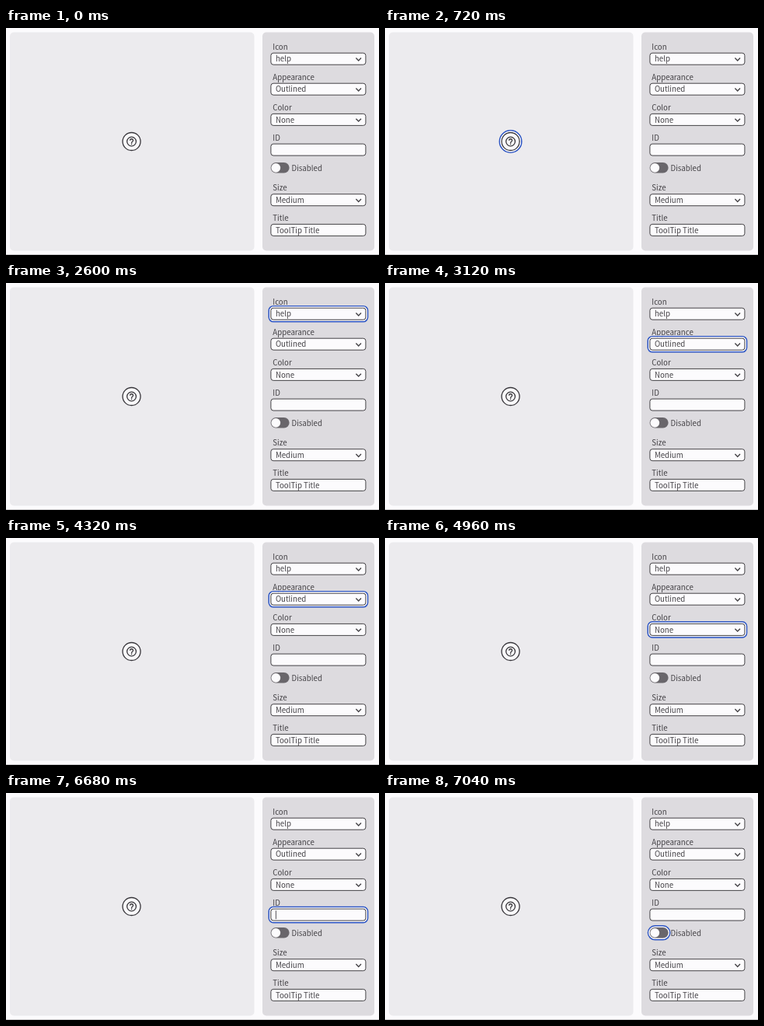
Write an HTML page that moves like this. It is 480x292 px and loops after 8 s.

```html
<!DOCTYPE html>
<html lang="en">
<head>
<meta charset="utf-8">
<title>Icon button playground</title>
<style>
  html, body { margin: 0; width: 100%; height: 100%; overflow: hidden; background: #fcfbfd; }
  svg { display: block; width: 480px; height: 292px; }
  text { font: 9.7px "Noto Sans CJK JP", "Noto Sans CJK SC", "Noto Sans CJK", "Open Sans", sans-serif; fill: #444246; }
</style>
</head>
<body>
<svg id="stage" viewBox="0 0 480 292"></svg>
<script>
const LOOP = 8000;
const INK = '#444246', PAPER = '#fcfbfd', LEFT = '#ecebee', RIGHT = '#dddbdf', BLUE = '#2c55c4';
const stage = document.getElementById('stage');

function add(tag, attrs, text = '') {
  const el = document.createElementNS('http://www.w3.org/2000/svg', tag);
  for (const key in attrs) el.setAttribute(key, attrs[key]);
  el.textContent = text;
  return stage.appendChild(el);
}
const box = (x, y, width, height, rx, attrs) => add('rect', { x, y, width, height, rx, ...attrs });
const write = (x, y, text) => add('text', { x, y }, text);

function field(label, top, value, isSelect) {
  write(343.3, top - 4.2, label);
  box(340.9, top + .4, 122, 15, 3.2, { fill: PAPER, stroke: INK, 'stroke-width': 1 });
  write(346.9, top + 11.6, value);
  if (isSelect) add('path', {
    d: `M450.4 ${top + 6.8}l3.3 3.3l3.3-3.3`, fill: 'none', stroke: INK, 'stroke-width': 1.4
  });
}

// Concentric outlines around a control: panel-coloured halo, blue line, white gap
function ring(x, y, w, h, r, halo) {
  return [[3.2, 1, halo], [2.1, 1.6, BLUE], [.9, 1, PAPER]].map(([gap, width, stroke]) =>
    box(x - gap, y - gap, w + 2 * gap, h + 2 * gap, r + gap,
      { fill: 'none', stroke, 'stroke-width': width }));
}
const fieldRing = top => ring(340.4, top, 123, 15.8, 3.5, RIGHT);

box(5, 5.5, 314.5, 281, 5, { fill: LEFT });
box(330, 5.5, 144, 281, 5, { fill: RIGHT });
box(0, 291, 480, 1, 0, { fill: '#c9c8ca' });

// Help button
add('circle', { cx: 161.6, cy: 146, r: 11.5, fill: '#f9f8fa', stroke: '#37353a', 'stroke-width': 1.3 });
add('path', {
  transform: 'translate(153.8 138.2) scale(.65)', fill: '#37353a',
  d: 'M11 18h2v-2h-2zM12 2a10 10 0 1 0 0 20a10 10 0 1 0 0-20zm0 18a8 8 0 1 1 0-16a8 8 0 1 1 0 16z' +
     'M12 6a4 4 0 0 0-4 4h2a2 2 0 0 1 4 0c0 2-3 1.75-3 5h2c0-2.25 3-2.5 3-5a4 4 0 0 0-4-4z'
});

field('Icon', 31.8, 'help', true);
field('Appearance', 70.8, 'Outlined', true);
field('Color', 110, 'None', true);
field('ID', 148.7, '', false);
field('Size', 213.3, 'Medium', true);
field('Title', 252, 'ToolTip Title', false);

// Disabled switch
box(340.6, 173, 24, 13.6, 6.8, { fill: '#69666b' });
add('circle', { cx: 347.3, cy: 179.8, r: 5.9, fill: PAPER });
write(367.5, 183.5, 'Disabled');

const focusStops = [
  [720, 1920, ring(149.5, 133.9, 24.2, 24.2, 12.1, LEFT)],
  [1920, 2920, fieldRing(31.8)],
  [2920, 4400, fieldRing(70.8)],
  [4400, 5720, fieldRing(110)],
  [5720, 6880, fieldRing(148.7)],
  [6880, LOOP, ring(340.6, 173, 24, 13.6, 6.8, RIGHT)]
];
const caret = box(346.9, 151.2, .9, 11, 0, { fill: INK });

const show = (el, on) => el.setAttribute('visibility', on ? 'visible' : 'hidden');
const within = (t, from, to) => t >= from && t < to;

let start;
function draw(now) {
  start ??= now;
  const t = (now - start) % LOOP;
  for (const [from, to, parts] of focusStops)
    for (const part of parts) show(part, within(t, from, to));
  show(caret, within(t, 5720, 6200) || within(t, 6680, 6880));
  requestAnimationFrame(draw);
}
requestAnimationFrame(draw);
</script>
</body>
</html>
```
